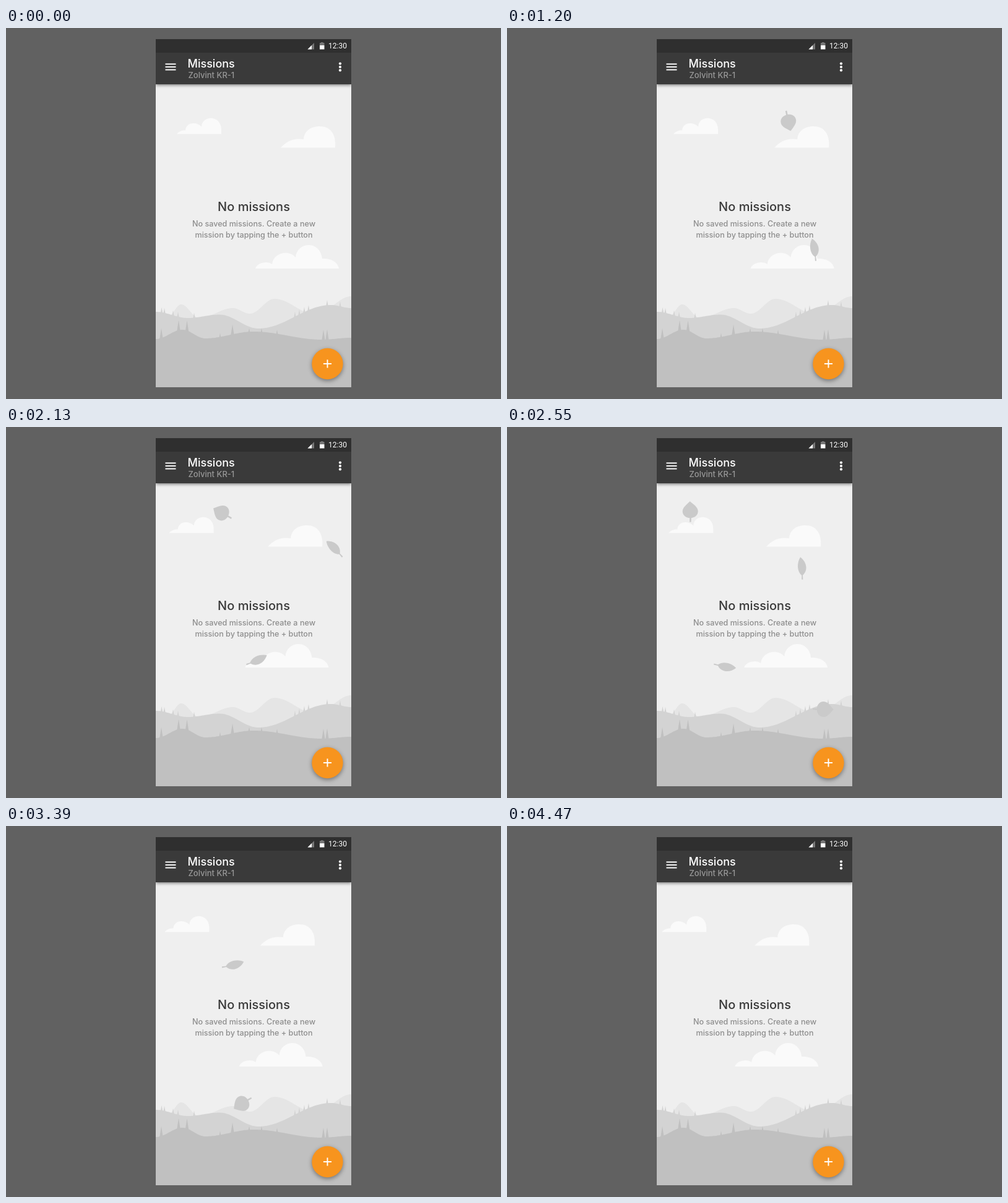
Write an HTML page with a canvas that moves like this. It is 800 px wide and 600 px high and loops after 4500 ms.

```html
<!DOCTYPE html>
<html lang="en">
<head>
<meta charset="utf-8">
<title>No missions</title>
<style>
html, body { margin: 0; width: 100%; height: 100%; overflow: hidden; background: #616161; }
canvas { display: block; }
</style>
</head>
<body>
<canvas id="stage" width="800" height="600"></canvas>
<script>
const ctx = document.getElementById('stage').getContext('2d');
const LOOP = 4500, STEP = 30, HOLD = 90;
const LEFT = 242, RIGHT = 558, TOP = 18, BOTTOM = 581, WIDTH = RIGHT - LEFT;
const SANS = 'Inter, "Open Sans", sans-serif';

// Outlines start at the lower left corner; drift is px per loop.
const clouds = [
  { x: 276, y: 171.5, drift: -26,
    path: new Path2D('M0 0C4 -5 9 -6 14 -6C15 -19 31 -21 40 -12C41 -31 72 -31 72 -7V0Z') },
  { x: 444, y: 193.5, drift: -44,
    path: new Path2D('M0 0C9 -10 20 -16 37 -13.5C38 -28 50 -34.5 63 -34.5C80 -34.5 90 -22 88 0Z') },
  { x: 403, y: 389, drift: -35,
    path: new Path2D('M0 0C3 -10 20 -13 27 -7C29 -26 54 -31 65 -18C67 -44 105 -46 108 -16C122 -17 134 -10 135 0Z') }
];

// Leaves point along +x, stem behind.
const roundLeaf = new Path2D('M14.5 0C9 -6 5 -12.3 -1.5 -12.5C-9 -12.5 -12.5 -6 -12.5 0C-12.5 6 -9 12.5 -1.5 12.5C5 12.3 9 6 14.5 0ZM-11 -1.3L-19 -1.6V.9L-11 1.3Z');
const narrowLeaf = new Path2D('M17.5 1C10 -6 -4 -9 -12 -2L-18.5 -3.4L-19 -1.2L-12 -.4C-6 10 8 10 17.5 1Z');

// Each leaf glides along one cubic curve; angle in degrees, spin in degrees per second.
const leaves = [
  { shape: roundLeaf, start: 0, end: 3200, angle: -94, spin: 142,
    curve: [[571, 118], [483, 202], [350, 103], [214, 146]] },
  { shape: narrowLeaf, start: 0, end: 3400, angle: 158, spin: 81,
    curve: [[576, 539], [513, 171], [428, 501], [216, 340]] },
  { shape: narrowLeaf, start: 1750, end: 4450, angle: 183, spin: 96,
    curve: [[580, 137], [463, 320], [347, 182], [230, 210]] },
  { shape: roundLeaf, start: 2100, end: LOOP, angle: -78, spin: 175,
    curve: [[571, 575], [483, 256], [305, 584], [226, 453]] }
];

// Crests and valleys, joined by cosine slopes.
const farHill = [[262, 466], [283, 447], [312, 469], [367, 453], [394, 462], [434, 438], [500, 463], [558, 434]];
const midHill = [[242, 459], [294, 469], [345, 463.5], [408, 486], [525, 448], [558, 453]];
const nearHill = [[242, 503], [285, 488], [322, 502], [400, 491], [510, 504], [558, 501]];

function groundAt(hill, x) {
  let i = 1;
  while (i < hill.length - 1 && x > hill[i][0]) i++;
  const [x0, y0] = hill[i - 1], [x1, y1] = hill[i];
  const u = (x - x0) / (x1 - x0);
  return y0 + (y1 - y0) * (1 - Math.cos(Math.PI * u)) / 2;
}

function drawHill(hill, color) {
  ctx.fillStyle = color;
  ctx.beginPath();
  ctx.moveTo(hill[0][0], BOTTOM);
  for (let x = hill[0][0]; x <= RIGHT; x += 2) ctx.lineTo(x, groundAt(hill, x));
  ctx.lineTo(RIGHT, BOTTOM);
  ctx.fill();
}

function drawSpruces(hill, height, color, ...spots) {
  const half = 1.2 + height * 0.12;
  ctx.fillStyle = color;
  for (const x of spots) {
    const y = groundAt(hill, x);
    ctx.beginPath();
    ctx.moveTo(x, y - height);
    ctx.lineTo(x + half, y + 4);
    ctx.lineTo(x - half, y + 4);
    ctx.fill();
  }
}

function fill(path, color) {
  ctx.fillStyle = color;
  ctx.fill(path);
}

function rect(x, y, w, h, color) {
  ctx.fillStyle = color;
  ctx.fillRect(x, y, w, h);
}

function disc(x, y, r, color) {
  ctx.fillStyle = color;
  ctx.beginPath();
  ctx.arc(x, y, r, 0, Math.PI * 2);
  ctx.fill();
}

function text(str, x, y, font, color, align = 'left') {
  ctx.font = font;
  ctx.fillStyle = color;
  ctx.textAlign = align;
  ctx.fillText(str, x, y);
}

function withShadow(alpha, blur, dy, draw) {
  ctx.save();
  ctx.shadowColor = `rgba(0,0,0,${alpha})`;
  ctx.shadowBlur = blur;
  ctx.shadowOffsetY = dy;
  draw();
  ctx.restore();
}

function bezier(curve, u) {
  const v = 1 - u;
  const at = k => v ** 3 * curve[0][k] + 3 * v * v * u * curve[1][k]
                + 3 * v * u * u * curve[2][k] + u ** 3 * curve[3][k];
  return [at(0), at(1)];
}

function drawLeaf({ shape, start, end, angle, spin, curve }, t) {
  if (t < start || t > end) return;
  ctx.save();
  ctx.translate(...bezier(curve, (t - start) / (end - start)));
  ctx.rotate((angle + spin * (t - start) / 1000) * Math.PI / 180);
  fill(shape, '#cacaca');
  ctx.restore();
}

function drawScene(t) {
  rect(LEFT, TOP, WIDTH, BOTTOM - TOP, '#efefef');
  for (const c of clouds) {
    ctx.save();
    ctx.translate(c.x + c.drift * t / LOOP, c.y);
    fill(c.path, '#fafafa');
    ctx.restore();
  }
  drawHill(farHill, '#e5e5e5');
  drawHill(midHill, '#d3d3d3');
  drawSpruces(midHill, 8, '#d3d3d3', 251.5, 256, 270, 278, 304, 467, 474, 482, 489, 519, 540);
  for (const leaf of leaves) drawLeaf(leaf, t);
  drawHill(nearHill, '#c0c0c0');
  drawSpruces(nearHill, 16, '#c0c0c0', 251, 279, 292.5, 366, 513, 519);
  drawSpruces(nearHill, 6, '#c0c0c0', 346, 393, 413, 438);
}

function drawMessage() {
  text('No missions', 400.5, 295.5, `500 20px ${SANS}`, '#393939', 'center');
  const small = `500 12.6px ${SANS}`;
  text('No saved missions. Create a new', 400.5, 321, small, '#8d8d8d', 'center');
  text('mission by tapping the + button', 400.5, 339, small, '#8d8d8d', 'center');
}

function drawBars() {
  withShadow(0.5, 5, 1.5, () => rect(LEFT, 40, WIDTH, 51, '#3a3a3a'));
  rect(LEFT, TOP, WIDTH, 22, '#2f2f2f');

  fill(new Path2D('M487.5 34.5L498 24V34.5Z'), '#777');
  fill(new Path2D('M487.5 34.5L494 28V34.5Z'), '#fff');
  rect(509, 23, 3.5, 2, '#777');
  rect(507, 24, 7.5, 4, '#777');
  rect(507, 28, 7.5, 6.5, '#fff');
  text('12:30', 521, 33, '12px Roboto, sans-serif', '#fff');

  for (const side of [-1, 0, 1]) {
    rect(257.5, 62 + 4.6 * side, 17, 1.9, '#fff');
    disc(540, 63 + 5.4 * side, 2.1, '#fff');
  }
  text('Missions', 293.5, 63.5, `500 18px ${SANS}`, '#fff');
  text('Zolvint KR-1', 294.5, 81, `500 13px ${SANS}`, '#989898');
}

function drawButton() {
  const x = 519.5, y = 543, arm = 6.6, half = 0.95;
  withShadow(0.4, 7, 2.5, () => disc(x, y, 25.2, '#f7941e'));
  rect(x - arm, y - half, 2 * arm, 2 * half, '#fff');
  rect(x - half, y - arm, 2 * half, 2 * arm, '#fff');
}

function render() {
  const now = performance.now() % LOOP;
  const t = now < HOLD ? 0 : Math.floor(now / STEP) * STEP;
  rect(0, 0, 800, 600, '#616161');
  ctx.save();
  ctx.beginPath();
  ctx.rect(LEFT, TOP, WIDTH, BOTTOM - TOP);
  ctx.clip();
  drawScene(t);
  drawMessage();
  drawBars();
  drawButton();
  ctx.restore();
  requestAnimationFrame(render);
}
render();
</script>
</body>
</html>
```
